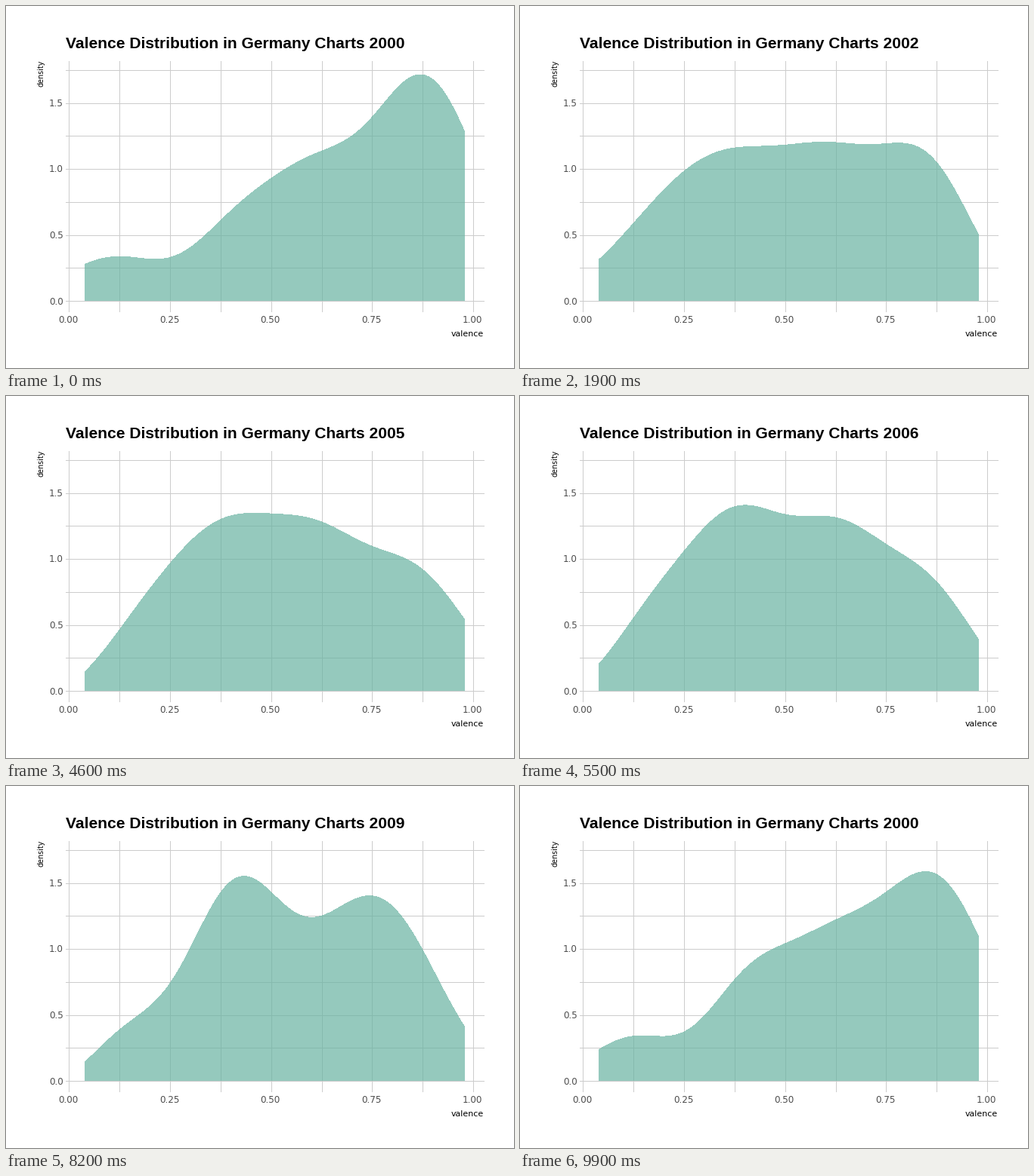
A matplotlib script that plays this animation: 672x480 px, repeating every 10000 ms.

```python
import numpy as np
import matplotlib.pyplot as plt
from matplotlib.animation import FuncAnimation

W, H, DPI = 672, 480, 100
PX = 72 / DPI  # points per pixel
X0, X_UNIT = 83.0, 534.6
Y0, Y_UNIT = 390.2, 175.0
X_MIN, X_MAX = 0.04, 0.98
BANDWIDTH = 0.12
FRAMES, YEARS = 100, 11

# A few key heights per year, evenly spaced from X_MIN to X_MAX
KEY_HEIGHTS = {
    2000: [.275, .328, .355, .655, .945, 1.135, 1.37, 1.71, 1.275],
    2002: [.31, .695, 1.035, 1.163, 1.182, 1.198, 1.188, 1.09, .495],
    2004: [.285, .64, .985, 1.185, 1.253, 1.155, 1.042, 1.02, .685],
    2006: [.2, .685, 1.145, 1.403, 1.33, 1.31, 1.12, .865, .385],
    2008: [.24, .685, 1.18, 1.33, 1.165, 1.01, 1.083, 1.0, .63],
    2009: [.14, .46, .855, 1.485, 1.4, 1.25, 1.4, 1.06, .405],
    2010: [.115, .376, .6, 1.315, 1.365, 1.475, 1.55, 1.18, .515],
}


def kernel(x, centers):
    return np.exp(-0.5 * ((x[:, None] - centers) / BANDWIDTH) ** 2)


def density_curve(heights, x):
    """Sum of Gaussian kernels passing through the key heights."""
    centers = np.linspace(X_MIN, X_MAX, len(heights))
    weights = np.linalg.solve(kernel(centers, centers), heights)
    return kernel(x, centers) @ weights


def bump(x, center):
    return np.exp(-((x - center) / 0.2) ** 2)


xs = np.linspace(X_MIN, X_MAX, 512)
curves = {year: density_curve(h, xs) for year, h in KEY_HEIGHTS.items()}
# The years between blend their neighbours, with mass moved to the middle
for year in range(2001, 2009, 2):
    blend = (curves[year - 1] + curves[year + 1]) / 2
    curves[year] = blend + 0.05 * bump(xs, 0.55) - 0.1 * bump(xs, X_MIN)


def px(x):
    return X0 + X_UNIT * x


def py(y):
    return Y0 - Y_UNIT * y


fig = plt.figure(figsize=(W / DPI, H / DPI), dpi=DPI, facecolor="white")
ax = fig.add_axes([0, 0, 1, 1])
ax.set(xlim=(0, W), ylim=(H, 0))
ax.axis("off")


def label(x, y, text, size, **kw):
    kw = {"family": "DejaVu Sans", "color": "black", "va": "baseline", **kw}
    return ax.text(x, y, text, fontsize=size * PX, **kw)


# Quarter-pixel offsets keep line snapping on the intended row or column
grid = dict(color="#cccccc", lw=PX, antialiased=False,
            solid_capstyle="butt", zorder=1)
for k in range(9):
    x = np.ceil(px(k / 8)) + 0.25
    ax.plot([x, x], [73, 405], **grid)
for k in range(8):
    y = np.round(py(k / 4)) + 0.75
    ax.plot([79, 632], [y, y], **grid)

tick = dict(size=12, color="#4d4d4d")
for k in range(5):
    label(px(k / 4) - 0.5, 420, f"{k / 4:.2f}", ha="center", **tick)
for k in range(4):
    label(75.5, py(k / 2) + 5.3, f"{k / 2:.1f}", ha="right", **tick)

label(632, 438, "valence", 11, ha="right")
label(46.5, 72, "density", 9.7, rotation=90, ha="center", va="top")
title = label(79, 56, "", 21, family="Liberation Sans", weight="bold")

area, = ax.fill([0, 1, 1], [0, 0, 1], color="#69b3a2", alpha=0.7, lw=0,
                antialiased=False, zorder=2)


def transition(k):
    """First frame and number of steps of the k-th change of year."""
    return 5 + 9 * k + min(k, 2), 5 if k < 2 else 4


def update(frame):
    before, after, t = 2000, 2000, 1
    for k in range(YEARS):
        start, steps = transition(k)
        if frame >= start:
            before, after = 2000 + k, 2000 + (k + 1) % YEARS
            t = min(1, (frame - start + 1) / steps)
    density = (1 - t) * curves[before] + t * curves[after]
    top = np.column_stack([px(xs), py(density) + 0.5])
    base = [[px(X_MAX), py(0) + 0.5], [px(X_MIN), py(0) + 0.5]]
    area.set_xy(np.vstack([top, base]))
    year = after if t >= 0.5 else before
    title.set_text(f"Valence Distribution in Germany Charts {year}")
    return area, title


anim = FuncAnimation(fig, update, frames=FRAMES, interval=100,
                     repeat=True, repeat_delay=0)
plt.show()
```
